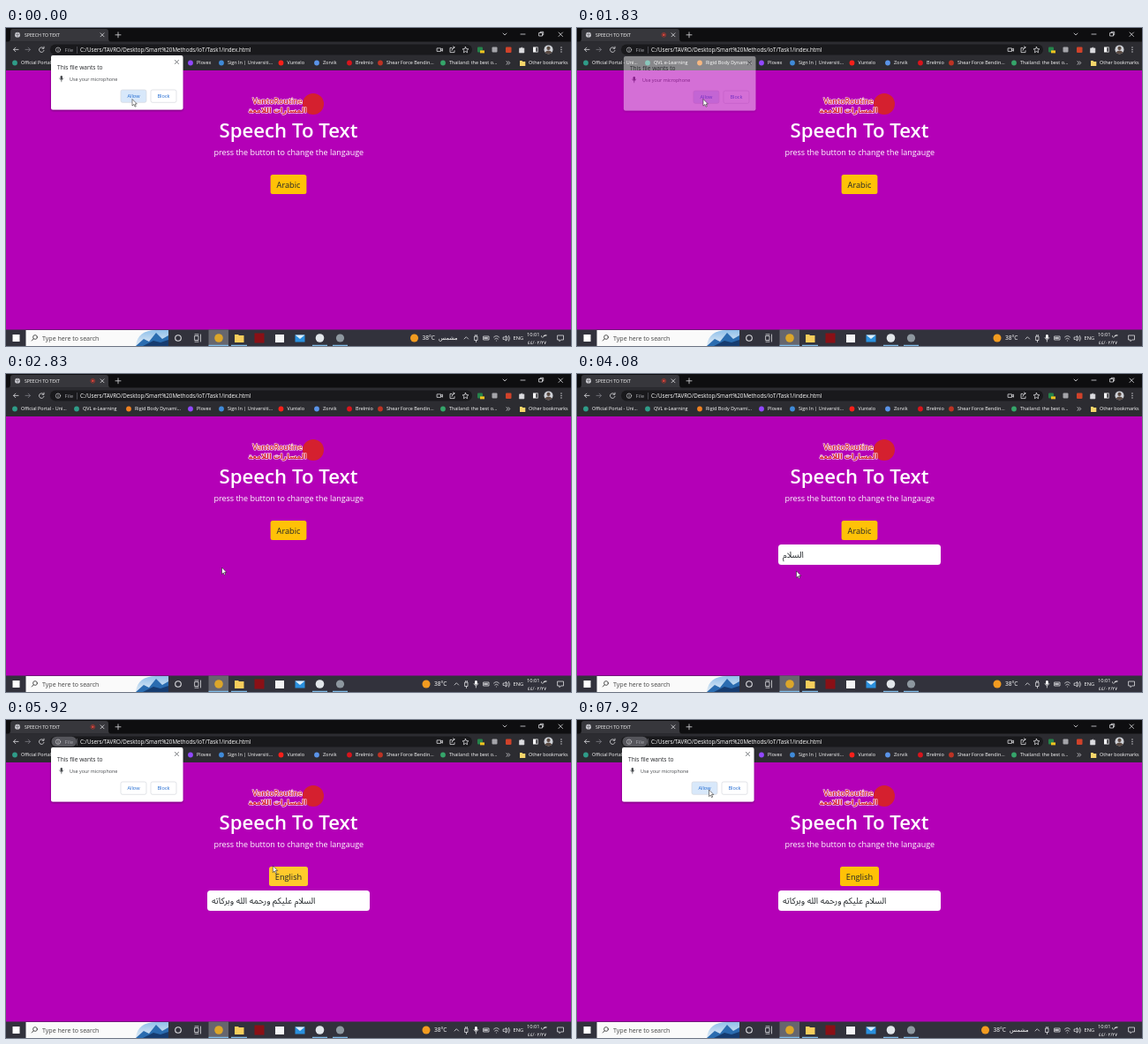
Recreate the animation shown at these times as an HTML page. Size 640 by 360 pixels, loop 8 s.

```html
<!DOCTYPE html>
<html lang="en">
<head>
<meta charset="utf-8">
<title>Speech To Text</title>
<style>
  html, body { margin: 0; width: 100%; height: 100%; overflow: hidden; background: #b400b7; }
  svg { display: block; width: 100vw; height: 100vh; font-family: "Open Sans", "Noto Sans", "DejaVu Sans", sans-serif; }
  .line { fill: none; stroke: #dcdce0; stroke-width: .8; stroke-linecap: round; stroke-linejoin: round; }
  .dim { stroke: #7d7d84; }
  .ink { fill: #fff; }
  .blue { fill: #1a66d0; }
  .mid { text-anchor: middle; }
</style>
</head>
<body>
<svg viewBox="0 0 640 360" preserveAspectRatio="none">
  <defs>
    <linearGradient id="sky" x2="0" y2="1">
      <stop stop-color="#8fc0ea"/><stop offset="1" stop-color="#e6eef6"/>
    </linearGradient>
    <filter id="soft" x="-10%" y="-10%" width="120%" height="130%">
      <feDropShadow dx="0" dy="1" stdDeviation="1.2" flood-opacity=".4"/>
    </filter>
  </defs>
  <rect width="640" height="360" fill="#b400b7"/>

  <!-- page -->
  <g>
    <circle cx="348" cy="86" r="12" fill="#d5202f"/>
    <g fill="#d5202f" stroke="#fff" stroke-width="1.2" paint-order="stroke" font-weight="600" class="mid">
      <text x="307.5" y="85.5" font-size="8.6">VantoRoutine</text>
      <text x="307.5" y="95.5" font-size="8">المسارات اللامعة</text>
    </g>
    <text class="ink mid" x="320" y="124" font-size="22.2" font-weight="600">Speech To Text</text>
    <text class="ink mid" x="320.3" y="144" font-size="9">press the button to change the langauge</text>
    <rect id="button" y="166" height="22" rx="2.5"/>
    <text id="language" class="mid" x="320" y="180.8" font-size="9.2" fill="#212529"></text>
    <g id="result">
      <rect x="228" y="193" width="184" height="23" rx="3.5" fill="#fff"/>
      <text id="speech" x="233" y="208" font-size="9.8" fill="#212529" style="font-family:'Noto Sans Arabic','DejaVu Sans',sans-serif"></text>
    </g>
  </g>

  <!-- browser -->
  <rect width="640" height="48" fill="#2c2c31"/>
  <rect width="640" height="15.5" fill="#0e0e10"/>
  <path d="M2 15.5Q5 15.5 5 12V4Q5 1 8 1H113Q116 1 116 4V12Q116 15.5 119 15.5Z" fill="#37373c"/>
  <circle cx="13" cy="7.8" r="3" fill="#d0d0d6"/>
  <path class="line" style="stroke:#44444a;stroke-width:.5" d="M10.5 7Q13 9 15.5 7M13 5V10.5"/>
  <text class="ink" x="21" y="9.9" font-size="5.2">SPEECH TO TEXT</text>
  <g id="recording"><circle cx="98.3" cy="7.8" r="2.4" fill="none" stroke="#b8342c" stroke-width=".7"/><circle cx="98.3" cy="7.8" r="1.3" fill="#e8463a"/></g>
  <path class="line" d="M107 5.8l4 4m0-4l-4 4M124 7.8h6m-3-3v6"/>
  <path class="line" d="M563 6l2 2l2-2M583 7h5M604 5.5h3.5v3.5h-3.5zM605.2 5.5v-1.2h3.5v3.5h-1.2M626 5l4.5 4.5m0-4.5l-4.5 4.5"/>
  <g transform="translate(0 .4)">
    <path class="line" d="M14 24H8.5l2.3-2.3M8.5 24l2.3 2.3"/>
    <path class="line dim" d="M22 24h5.5l-2.3-2.3M27.5 24l-2.3 2.3"/>
    <path class="line" d="M42.5 22.5A2.8 2.8 0 1 0 43 25M43 20.8v2h-2"/>
    <rect x="50" y="18" width="478" height="12" rx="6" fill="#19191c"/>
    <rect id="chip" x="51.5" y="18.3" width="28.5" height="11.4" rx="5.7" fill="#55555b"/>
    <circle cx="59" cy="24.3" r="2.7" class="line" style="stroke-width:.6"/>
    <path class="line" style="stroke-width:.6" d="M59 24v1.8M59 22.7v.1"/>
    <text x="66.5" y="26.4" font-size="6.1" fill="#a6a6ac">File</text>
    <path class="line dim" style="stroke-width:.5" d="M80.5 21v7"/>
    <text class="ink" x="84" y="26.4" font-size="6.25">C:/Users/TAVRO/Desktop/Smart%20Methods/IoT/Task1/index.html</text>
    <path class="line" d="M488.5 22.5h4v3.5h-4zM492.5 24l2-1.2v3l-2-1.2M505 22h-2v5.2h5v-2M505 25q0-3 3-3.5m-1.5-1l1.7 1l-1.5 1.4M520.5 21l1 2.2l2.4.2l-1.8 1.6l.5 2.4l-2.1-1.3l-2.1 1.3l.5-2.4l-1.8-1.6l2.4-.2z"/>
    <rect x="534" y="21" width="6" height="6" rx="1" fill="#25834a"/>
    <rect x="537" y="25" width="5" height="3" fill="#f0c420"/>
    <rect x="550.5" y="21" width="6" height="6" rx="1" fill="#a5a5aa"/>
    <rect x="566" y="21" width="6.5" height="6.5" rx="1" fill="#d0422a"/>
    <path class="line" d="M582 22.5h1.5q.5-2 1.8 0h1.5v5h-5z" style="fill:#dcdce0"/>
    <path d="M597 21.2h5.6v5.8h-5.6zM600.3 21.9v4.4h1.6v-4.4z" fill="#f4f4f6" fill-rule="evenodd"/>
    <circle cx="614.5" cy="24" r="5" fill="#cfd2d8"/>
    <path d="M610.5 27q4-4 8 0q-4 4-8 0M612.4 22.5a2.1 2.1 0 1 1 4.2 0a2.1 2.1 0 1 1-4.2 0" fill="#5a4a42"/>
    <path class="line" style="stroke-width:1.3" d="M629 21.5v.1M629 24v.1M629 26.5v.1"/>
  </g>
  <g id="bookmarks" font-size="5.45"></g>
  <path class="line" d="M567 37.8l1.5 1.7l-1.5 1.7m2.2-3.4l1.5 1.7l-1.5 1.7"/>
  <path d="M582 37h2.5l.8 1h3v5H582z" fill="#f5d56a"/>

  <!-- permission prompt -->
  <g id="prompt">
    <rect x="51" y="31" width="149.5" height="61.5" rx="2" fill="#fff" filter="url(#soft)"/>
    <path class="line" style="stroke:#505358" d="M191.5 36.5l4 4m0-4l-4 4"/>
    <text x="58" y="46.6" font-size="6.6" fill="#26282b">This file wants to</text>
    <rect x="61.6" y="54" width="2.4" height="4.4" rx="1.2" fill="#46494d"/>
    <path class="line" style="stroke:#46494d;stroke-width:.6" d="M60.6 57q2.2 4.4 4.4 0M62.8 59.2v1.6"/>
    <text x="72" y="59.5" font-size="5.4" fill="#46494d">Use your microphone</text>
    <g stroke="#d6d9de" stroke-width=".7" fill="#fff">
      <rect id="allow" x="130" y="70" width="29" height="14.3" rx="2"/>
      <rect x="164" y="70" width="29" height="14.3" rx="2"/>
    </g>
    <g class="blue mid" font-size="5.6"><text x="144.5" y="79.1">Allow</text><text x="178.5" y="79.1">Block</text></g>
  </g>

  <!-- taskbar -->
  <rect y="341.5" width="640" height="18.5" fill="#32323c"/>
  <rect x="7.5" y="347" width="8" height="8" fill="#fff"/>
  <rect x="22.5" y="342" width="161.5" height="18" fill="#fafafa"/>
  <path d="M147 360Q149 342 170 342H184V360Z" fill="url(#sky)"/>
  <path d="M147 360l9-8l6 3l8-10l7 7l7-4v12z" fill="#2a6cb0"/>
  <path d="M155 360l12-6l8 2l9-3v7z" fill="#163c70"/>
  <circle class="line" cx="33" cy="350" r="2.4" style="stroke:#333"/>
  <path class="line" style="stroke:#333" d="M31.2 351.8l-2 2.2"/>
  <text x="41" y="353.5" font-size="7.05" fill="#444">Type here to search</text>
  <circle class="line" cx="195" cy="351" r="3.3" style="stroke-width:1.1"/>
  <path class="line" d="M214 348.5h4v5h-4zM214 346.8h4M214 355.2h4M220.5 347v8"/>
  <rect x="229.5" y="341.5" width="22.5" height="18.5" fill="#66666e"/>
  <circle cx="241" cy="351" r="4.8" fill="#dca62a"/>
  <path d="M259 347h4l1 1h5.5v8H259z" fill="#f6cd5c"/>
  <rect x="281.5" y="345.5" width="11" height="11" fill="#8a1016"/>
  <rect x="305" y="347" width="10" height="9" fill="#f4f4f6"/>
  <path d="M327.5 347.5h11v8h-11z" fill="#2a90de"/>
  <path d="M327.5 347.5l5.5 4.5l5.5-4.5z" fill="#dceefa"/>
  <circle cx="355.5" cy="351" r="4.8" fill="#e2e6ea"/>
  <circle cx="378.5" cy="351" r="4.6" fill="#8d979f"/>
  <path d="M229.5 359.4h22.5M255 359.4h18M347 359.4h17M370 359.4h17" stroke="#80bbe8" stroke-width="1.2"/>
  <g id="weather">
    <circle cx="476" cy="351" r="4.5" fill="#f29b20"/>
    <text class="ink" x="485" y="353.4" font-size="6.6">38°C</text>
  </g>
  <text id="sunny" class="ink" x="490" y="353.3" font-size="6.6">مشمس</text>
  <path id="tray" class="line" d="M508 352l2.3-2.3l2.3 2.3M520 349h3v4.5h-3zM521.5 353.5v2M520.7 349v-1.6m1.6 1.6v-1.6"/>
  <g id="mic"><rect x="531" y="347" width="2.8" height="4.8" rx="1.4" class="ink"/><path class="line" d="M530 350.5q2.4 5 4.8 0M532.4 353v2"/></g>
  <path class="line" d="M541 349h6v4h-6zM542 350.5h3.5v1h-3.5zM552.5 350q3-3 6 0M553.7 352q1.8-1.8 3.6 0M555.5 354v.1M563.5 350h1.2l1.8-1.5v5.5l-1.8-1.5h-1.2zM568 349.5q1.5 1.8 0 3.6M569.5 348.3q2.4 3 0 6"/>
  <g class="ink">
    <text x="574.5" y="353" font-size="5.8">ENG</text>
    <text class="mid" x="601.5" y="348.5" font-size="5.7">10:01 ص</text>
    <text class="mid" x="601.5" y="357.5" font-size="5.4">٤٤/٠٢/٢٧</text>
  </g>
  <path class="line" d="M625 348h6.5v5h-3l-1.5 1.7v-1.7h-2z"/>

  <g id="cursor" fill="#fff" stroke="#111" stroke-width=".6">
    <path id="arrow" d="M0 0V9L2.1 7L3.6 10.2L5 9.5L3.5 6.5H6.3Z"/>
    <path id="hand" d="M0 0Q1.3-.8 1.7.6V4L5.5 5Q6.8 5.4 6.4 7.2L5.5 11H.5L-2.5 7Q-3 5.4-1 5.7L0 6.6Z"/>
  </g>
</svg>
<script>
const $ = id => document.getElementById(id);
const LOOP = 8000, STEP = 1000 / 12;

const bookmarks = [
  [10, "#2f9c88", "Official Portal - Uni..."], [80, "#2f9c88", "QVL e-Learning"],
  [139, "#f08020", "Rigid Body Dynami..."], [209, "#9147ff", "Plovex"],
  [244, "#3f8ad8", "Sign In | Universiti..."], [311.5, "#f8201a", "Vuntelo"],
  [352, "#5a93e8", "Zorvik"], [389, "#d8141c", "Brelmio"],
  [424, "#bd3324", "Shear Force Bendin..."], [495, "#35a56a", "Thailand: the best o..."]
];
$("bookmarks").innerHTML = bookmarks.map(([x, color, label]) =>
  `<circle cx="${x}" cy="39.5" r="2.9" fill="${color}"/><text class="ink" x="${x + 7}" y="41.4">${label}</text>`
).join("") + '<text class="ink" x="592" y="41.4">Other bookmarks</text>';

// time, x, y of the pointer tip
const path = [
  [0, 143, 80.5], [1830, 143, 80.5], [2080, 163, 112], [2500, 232, 206], [2830, 244.5, 219],
  [4080, 248.5, 223], [4420, 253, 221], [5000, 315, 182], [5330, 323, 174],
  [5750, 323, 174], [6150, 268, 150], [6500, 220.5, 129], [7000, 176, 100], [7500, 149.5, 79], [LOOP, 149.5, 79]
];
const phrases = [
  [3750, "السلام"], [4330, "السلام عليكم"], [4580, "السلام عليكم ورحمه الله"],
  [4830, "السلام عليكم ورحمه الله وبركاته"]
];

function pointerAt(t) {
  const i = path.findIndex(p => p[0] > t);
  const [t0, x0, y0] = path[i - 1], [t1, x1, y1] = path[i];
  const k = (t - t0) / (t1 - t0), ease = k * k * (3 - 2 * k);
  return [x0 + (x1 - x0) * ease, y0 + (y1 - y0) * ease];
}
const set = (id, name, value) => $(id).setAttribute(name, value);
const show = (id, on) => $(id).style.display = on ? "" : "none";

function draw(t) {
  const [x, y] = pointerAt(t);
  const english = t >= 5660;
  const listening = t >= 1740 && t < 7000;
  const prompted = t >= 5900;
  const closing = Math.min(1, Math.max(0, (t - 1740) / 165));
  const half = english ? 22 : 20.4;
  const overButton = Math.abs(x - 320) < half && y > 166 && y < 188;
  const overAllow = x > 130 && x < 159 && y > 70 && y < 84.3;

  set("cursor", "transform", `translate(${x} ${y}) scale(.85)`);
  show("arrow", !overButton);
  show("hand", overButton);

  set("prompt", "opacity", prompted ? 1 : 1 - closing);
  set("prompt", "transform", prompted ? "" : `translate(${closing * 3.4} ${closing * 1.8})`);
  set("allow", "fill", overAllow ? "#d8e8fa" : "#fff");
  show("chip", prompted);

  set("button", "x", 320 - half);
  set("button", "width", half * 2);
  set("button", "fill", overButton || (english && t < 7000) ? "#ffca2c" : "#ffc107");
  $("language").textContent = english ? "English" : "Arabic";

  const heard = phrases.filter(p => p[0] <= t).pop();
  show("result", heard);
  $("speech").textContent = heard ? heard[1] : "";

  show("recording", listening);
  show("mic", listening);
  show("sunny", !listening);
  set("weather", "transform", listening ? "" : "translate(-13.5 0)");
  set("tray", "transform", listening ? "" : "translate(11 0)");
}

function tick() {
  const t = performance.now() % LOOP;
  draw(Math.floor((t + 4) / STEP) * STEP % LOOP);
  requestAnimationFrame(tick);
}
tick();
</script>
</body>
</html>
```
